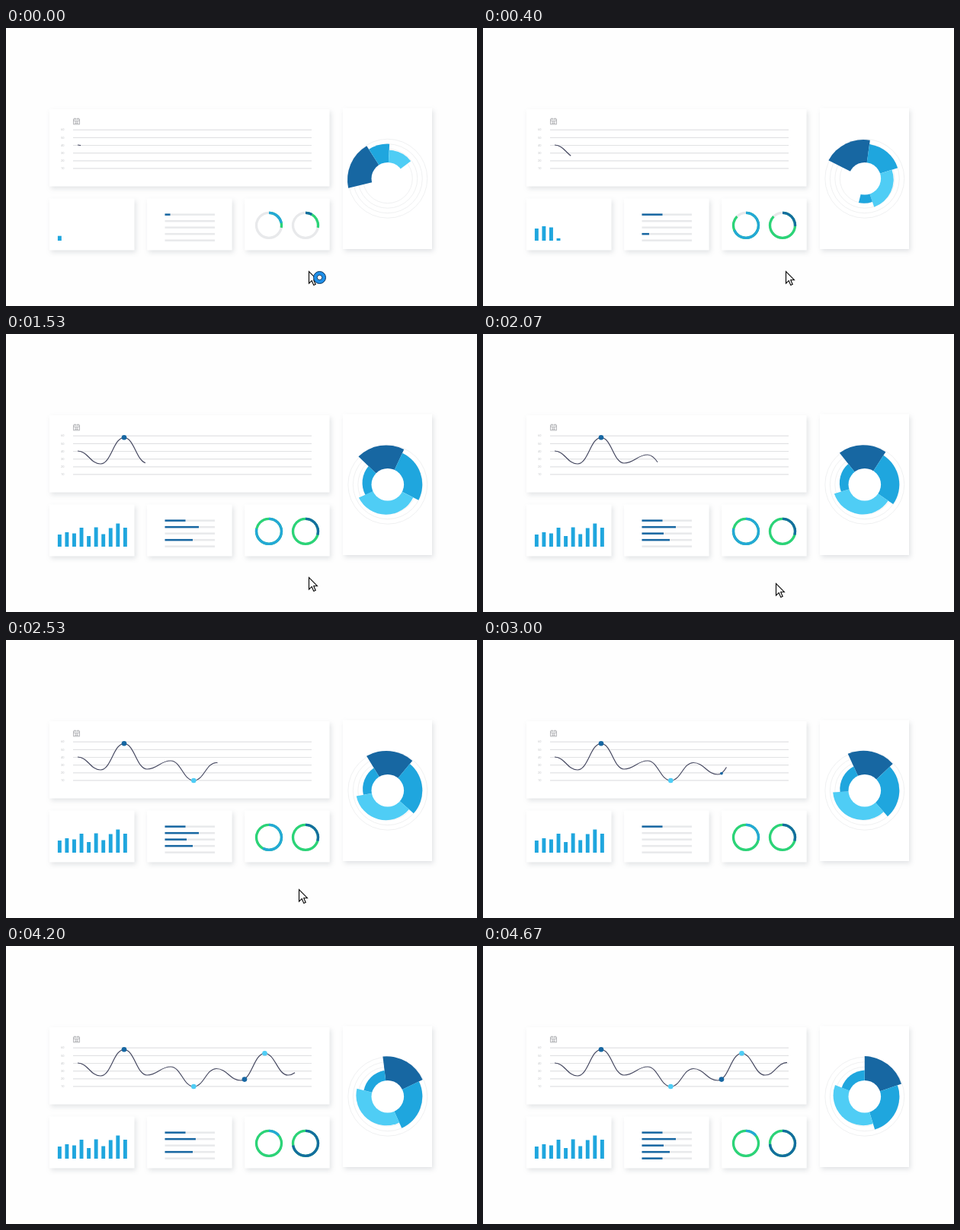
An HTML page for the animation above (4.74 s loop, 618x366 px).

```html
<!DOCTYPE html>
<html lang="en">
<head>
<meta charset="utf-8">
<title>Dashboard</title>
<style>
html, body { margin: 0; width: 100%; height: 100%; overflow: hidden; background: #fefefe; }
svg { display: block; width: 618px; height: 366px; }
.card { fill: #fff; filter: drop-shadow(2.5px 3px 3.2px rgba(60, 75, 90, .15)); }
text { font: 4px Roboto, sans-serif; fill: #c2c4c7; text-anchor: end; }
</style>
</head>
<body>
<svg id="stage" viewBox="0 0 618 366"></svg>
<script>
const LOOP = 4740, FPS = 15;
const NAVY = '#1767a2', BLUE = '#1fa6de', SKY = '#4fcdf5', GREEN = '#2bd477', TRACK = '#e8e9eb';
const stage = document.getElementById('stage');

function add(tag, attrs, parent = stage) {
  const el = document.createElementNS('http://www.w3.org/2000/svg', tag);
  set(el, attrs);
  parent.appendChild(el);
  return el;
}
function set(el, attrs) {
  for (const name in attrs) el.setAttribute(name, attrs[name]);
}

// Easing
const clamp = u => Math.max(0, Math.min(1, u));
const mix = (a, b, u) => a + (b - a) * u;
const smooth = u => { u = clamp(u); return u * u * (3 - 2 * u); };
const easeOut = u => 1 - (1 - clamp(u)) ** 3;
const popOut = u => { u = clamp(u) - 1; return 1 + 2.9 * u ** 3 + 1.9 * u * u; };

// Monotone cubic through [time, value] keys, held at both ends
function key(t, keys) {
  const n = keys.length - 1;
  if (t <= keys[0][0]) return keys[0][1];
  if (t >= keys[n][0]) return keys[n][1];
  const i = keys.findIndex(k => k[0] > t) - 1;
  const slope = j => (keys[j + 1][1] - keys[j][1]) / (keys[j + 1][0] - keys[j][0]);
  const tangent = j => {
    if (j === 0) return slope(0);
    if (j === n) return slope(n - 1);
    const a = slope(j - 1), b = slope(j);
    return a * b > 0 ? 2 * a * b / (a + b) : 0;
  };
  const h = keys[i + 1][0] - keys[i][0], u = (t - keys[i][0]) / h, v = 1 - u;
  return keys[i][1] * v * v * (1 + 2 * u) + keys[i + 1][1] * u * u * (3 - 2 * u)
    + h * u * v * (tangent(i) * v - tangent(i + 1) * u);
}

// Cards
const card = (x, y, width, height) => add('rect', { x, y, width, height, class: 'card' });
card(57, 107, 367.5, 101.5);
for (let i = 0; i < 3; i++) card(57 + i * 128.1, 224.5, 111.5, 68);
card(442, 105.5, 117, 185.5);

// Line chart
for (let i = 0; i < 6; i++) {
  const y = 134.2 + i * 10.15;
  add('path', { d: `M88 ${y}H401`, stroke: '#e1e2e4', 'stroke-width': 1.2 });
  add('text', { x: 76.5, y: y + 1.2 }).textContent = 60 - i * 10;
}
add('path', {
  d: 'M88.5 119.8h8v7h-8zM88.5 122h8M90.5 118.3v2M94.5 118.3v2M90 123.7h5M90 125.4h5',
  fill: 'none', stroke: '#a2a4a7', 'stroke-width': .8
});

const turns = [[94, 154], [124, 171], [155, 136.3], [185, 170], [216, 159], [246.3, 185],
  [276, 161.5], [308, 177], [339.5, 141.3], [370, 170], [399, 153.3]];
const curve = add('path', {
  d: turns.map(([x, y], i) => {
    if (!i) return `M${x} ${y}`;
    const [px, py] = turns[i - 1], h = (x - px) * .45;
    return `C${px + h} ${py} ${x - h} ${y} ${x} ${y}`;
  }).join(''),
  fill: 'none', stroke: '#474a62', 'stroke-width': 1.2
});
const curveLength = curve.getTotalLength();
function lengthAt(x) {
  let lo = 0, hi = curveLength;
  for (let i = 0; i < 14; i++) {
    const mid = (lo + hi) / 2;
    if (curve.getPointAtLength(mid).x < x) lo = mid; else hi = mid;
  }
  return lo;
}
const penKeys = [[0, 98], [1000, 144], [2070, 229], [3000, 319], [4670, 399]];
const dots = [turns[2], turns[5], [313, 175.6], turns[8]].map(([cx, cy], i) => (
  { cx, el: add('circle', { cx, cy, fill: i % 2 ? SKY : NAVY }) }
));
function drawLine(t) {
  const pen = key(t, penKeys);
  set(curve, { 'stroke-dasharray': `${lengthAt(pen)} ${curveLength + 10}` });
  dots.forEach(({ cx, el }) => set(el, { r: 3.3 * Math.max(0, popOut((pen - cx - 4) / 14)) }));
}

// Column chart
const columns = [16, 19, 17.5, 25, 14, 25.5, 16.5, 24.5, 30.5, 25].map((height, i) => (
  { height, el: add('rect', { x: 67.9 + i * 9.56, width: 4.9, fill: BLUE }) }
));
function drawColumns(t) {
  columns.forEach(({ height, el }, i) => {
    const h = height * smooth((t + 60 - 143 * i) / 140);
    set(el, { y: 280 - h, height: h });
  });
}

// Progress bars fill in two rounds; the gaps between starts grow, then shrink
const ROUND_TWO = 2730;
const bars = [27, 44.5, 28.5, 36.5, 27].map((width, i) => {
  const box = { x: 208.5, y: 244.4 + i * 8.5, height: 2.5 };
  add('rect', { ...box, width: 65.5, fill: TRACK });
  return { width, el: add('rect', { ...box, fill: NAVY }) };
});
const fillOrder = [0, 3, 1, 2, 4];
const geometric = (first, ratio, n) => first * (ratio ** n - 1) / (ratio - 1);
function drawBars(t) {
  fillOrder.forEach((bar, n) => {
    const start = t < ROUND_TWO ? geometric(400, 1.48, n) - 80 : geometric(850, .5, n) + ROUND_TWO;
    set(bars[bar].el, { width: bars[bar].width * smooth((t - start) / 240) });
  });
}

// Ring gauges: the coloured part grows with the ring, then eases to a second value
function gauge(cx, color, first, second, change) {
  const ring = stroke => add('circle', {
    cx, cy: 259.8, r: 16.5, fill: 'none', stroke, 'stroke-width': 3.3,
    pathLength: 360, transform: `rotate(-90 ${cx} 259.8)`
  });
  ring(TRACK);
  return { whole: ring(GREEN), part: ring(color), first, second, change };
}
const gauges = [gauge(345, '#24a8d7', 282, 51, 2330), gauge(393, '#146d9f', 107, 266, 3050)];
function drawGauges(t) {
  const grown = smooth((t + 325) / 930);
  const dash = deg => ({ 'stroke-dasharray': `${deg} 400` });
  gauges.forEach(({ whole, part, first, second, change }) => {
    set(whole, dash(360 * grown));
    set(part, dash(grown * mix(first, second, easeOut((t - change) / 1700))));
  });
}

// Rotating pie: slices follow one another clockwise while they open
const CX = 500.8, CY = 198.2;
for (let r = 32.5; r <= 52; r += 6.5) {
  add('circle', { cx: CX, cy: CY, r, fill: 'none', stroke: '#ebecee', 'stroke-width': .8 });
}
const slice = (fill, width, r0, r1, start, time) => ({ width, r0, r1, start, time, el: add('path', { fill }) });
const slices = [
  slice(NAVY, 71, 53.2, 51, -500, 500),
  slice(BLUE, 92, 45.6, 45.4, -500, 1290),
  slice(SKY, 128.5, 37.5, 41.7, -500, 1290),
  slice(BLUE, 68.5, 32.3, 34.8, 0, 850)
];
add('circle', { cx: CX, cy: CY, r: 21.3, fill: '#fff' });

function wedge(from, to, r0, r1) {
  const at = (deg, r) => {
    const a = deg * Math.PI / 180;
    return `${CX + r * Math.sin(a)} ${CY - r * Math.cos(a)}`;
  };
  const r = (r0 + r1) / 2;
  return `M${CX} ${CY}L${at(from, r0)}A${r} ${r} 0 0 1 ${at(to, r1)}Z`;
}
function drawPie(t) {
  let from = 291.3 + t * .01471 - 35 * (1 - easeOut(t / 500));
  slices.forEach(({ width, r0, r1, start, time, el }) => {
    const u = clamp((t - start) / time), to = from + width * u;
    set(el, { d: u ? wedge(from, to, r0, mix(r0, r1, u * u)) : '' });
    from = to;
  });
}

// Pointer
const pointer = add('g', {});
add('path', {
  d: 'M.5 .5V16.2L4.2 12.7L6.8 18.6L9.2 17.5L6.7 11.7H11.4Z',
  fill: '#fff', stroke: '#000', 'stroke-width': 1.1
}, pointer);
const busy = add('g', {}, pointer);
[[8, '#1f8fe8'], [3.2, '#fff']].forEach(([r, fill]) =>
  add('circle', { cx: 14.5, cy: 8.5, r, fill, stroke: '#10365c' }, busy));
function drawPointer(t) {
  const drift = smooth((t - 1850) / 210), leave = smooth((t - 2730) / 220);
  set(pointer, { transform: `translate(${397 - 13 * drift - 4 * leave} ${320 + 8 * drift + 42 * leave})` });
  set(busy, { visibility: t < 200 ? 'visible' : 'hidden' });
}

const parts = [drawLine, drawColumns, drawBars, drawGauges, drawPie, drawPointer];
const origin = performance.now();
function tick() {
  const t = (performance.now() - origin) % LOOP;
  const step = Math.min(70, Math.floor((t + 5) * FPS / 1000));
  parts.forEach(draw => draw(step * 1000 / FPS));
  requestAnimationFrame(tick);
}
tick();
</script>
</body>
</html>
```
